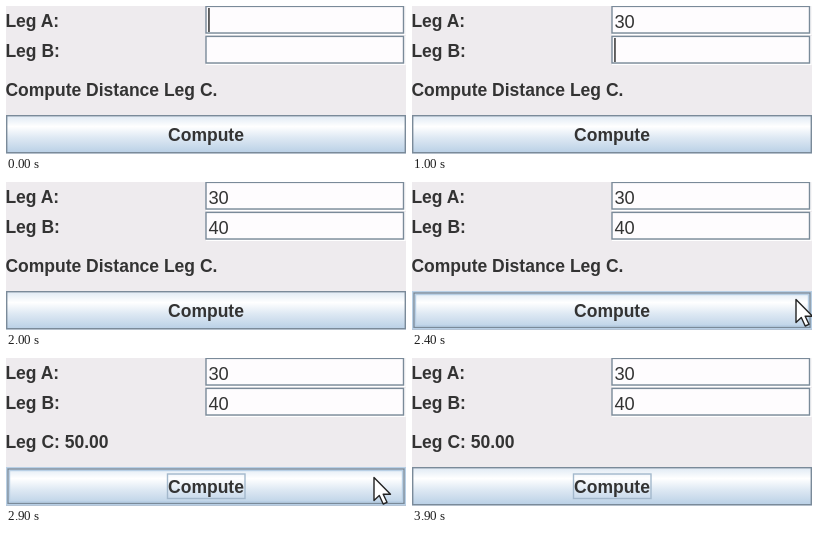
An HTML page for the animation above (4000 ms loop, 400x148 px).

```html
<!DOCTYPE html>
<html lang="en">
<head>
<meta charset="utf-8">
<title>Leg calculator</title>
<style>
  html, body { margin: 0; width: 100%; height: 100%; overflow: hidden; background: #eeebee; }
  svg { display: block; }
  text { font: bold 17.5px "Liberation Sans", Arial, sans-serif; fill: #333; }
  .value { font-weight: normal; font-size: 18.3px; }
  .field { fill: #fefcfe; stroke: #7a8a99; stroke-width: 1.4; }
  .shine { fill: none; stroke: #fff; stroke-width: 1.4; }
  .edge { fill: none; stroke: #7a8a99; stroke-width: 1.4; }
  .glow { fill: none; stroke: #b8cfe5; stroke-width: 1.4; }
</style>
</head>
<body>
<svg width="400" height="148" viewBox="0 0 400 148">
  <defs>
    <linearGradient id="steel" x2="0" y2="1">
      <stop stop-color="#dde8f3"/>
      <stop offset=".3" stop-color="#fff"/>
      <stop offset=".6" stop-color="#dde8f3"/>
      <stop offset="1" stop-color="#b8cfe5"/>
    </linearGradient>
  </defs>

  <text x="-.6" y="21.2">Leg A:</text>
  <text x="-.6" y="51.2">Leg B:</text>
  <text x="-.6" y="90.1" id="result"></text>

  <path class="shine" d="M200 28.4H398.9V0M200 58.4H398.9V30"/>
  <rect class="field" x="200" y=".4" width="197.5" height="26.6"/>
  <rect class="field" x="200" y="30.4" width="197.5" height="26.6"/>
  <text class="value" x="202.4" y="21.6" id="legA"></text>
  <text class="value" x="202.4" y="51.6" id="legB"></text>
  <rect id="caret" width="1.5" height="24" fill="#333"/>

  <rect id="face" y="109" width="400" height="38.4"/>
  <rect class="edge" x=".7" y="109.7" width="398.6" height="37"/>
  <path id="sunk" class="edge" d="M2.1 146V111.1H399"/>
  <g id="hover">
    <rect class="glow" x=".7" y="109.7" width="398.6" height="37"/>
    <rect class="edge" x="2.1" y="111.1" width="395.8" height="34.2"/>
    <rect class="glow" x="3.5" y="112.5" width="393" height="31.4"/>
  </g>
  <rect id="focus" x="161.5" y="116" width="77.5" height="24.5" fill="none" stroke="#a3b8cc" stroke-width="1.4"/>
  <text x="200" y="135" text-anchor="middle">Compute</text>

  <path id="pointer" d="M0 0V23L5.3 18L9.2 26.5L13 24.8L9.2 16.7H16.5Z"
        fill="#fff" stroke="#222" stroke-width="1.4" stroke-linejoin="round"/>
</svg>
<script>
const el = id => document.getElementById(id);
const show = (id, on) => el(id).setAttribute("visibility", on ? "visible" : "hidden");
const LOOP = 4000, STEP = 100, BLINK = 500;
const TAB = 800, PRESS = 2600, RELEASE = 2900;
const keysA = [300, 500], keysB = [1300, 1500];
const path = [[2200, 402, 112], [2400, 384, 117.5], [2600, 368, 119.5], [2900, 368, 119.5], [3200, 404, 140]];

const typed = (text, keys, t) => text.slice(0, keys.filter(k => t >= k).length);

function pointerAt(t) {
  const i = path.findIndex(p => p[0] > t);
  if (i < 1) return null;
  const [t0, x0, y0] = path[i - 1], [t1, x1, y1] = path[i];
  const k = (t - t0) / (t1 - t0);
  return [x0 + (x1 - x0) * k, y0 + (y1 - y0) * k];
}

function draw(t) {
  const a = typed("30", keysA, t), b = typed("40", keysB, t);
  el("legA").textContent = a;
  el("legB").textContent = b;
  el("result").textContent = t < RELEASE ? "Compute Distance Leg C." : "Leg C: 50.00";

  const inB = t >= TAB;
  const lastEvent = Math.max(...[0, TAB, ...keysA, ...keysB].filter(k => k <= t));
  el("caret").setAttribute("x", 202.2 + 10.4 * (inB ? b : a).length);
  el("caret").setAttribute("y", inB ? 32 : 2);
  show("caret", t < PRESS && (t - lastEvent) % (2 * BLINK) < BLINK);

  const pressed = t >= PRESS && t < RELEASE, pos = pointerAt(t);
  el("face").setAttribute("fill", pressed ? "#b8cfe5" : "url(#steel)");
  show("sunk", pressed);
  show("hover", pos && !pressed);
  show("focus", t >= PRESS);
  show("pointer", pos);
  if (pos) el("pointer").setAttribute("transform", `translate(${pos})`);
}

const start = performance.now();
function tick() {
  const t = (performance.now() - start) % LOOP;
  draw(Math.floor(t / STEP) * STEP);
  requestAnimationFrame(tick);
}
tick();
</script>
</body>
</html>
```
